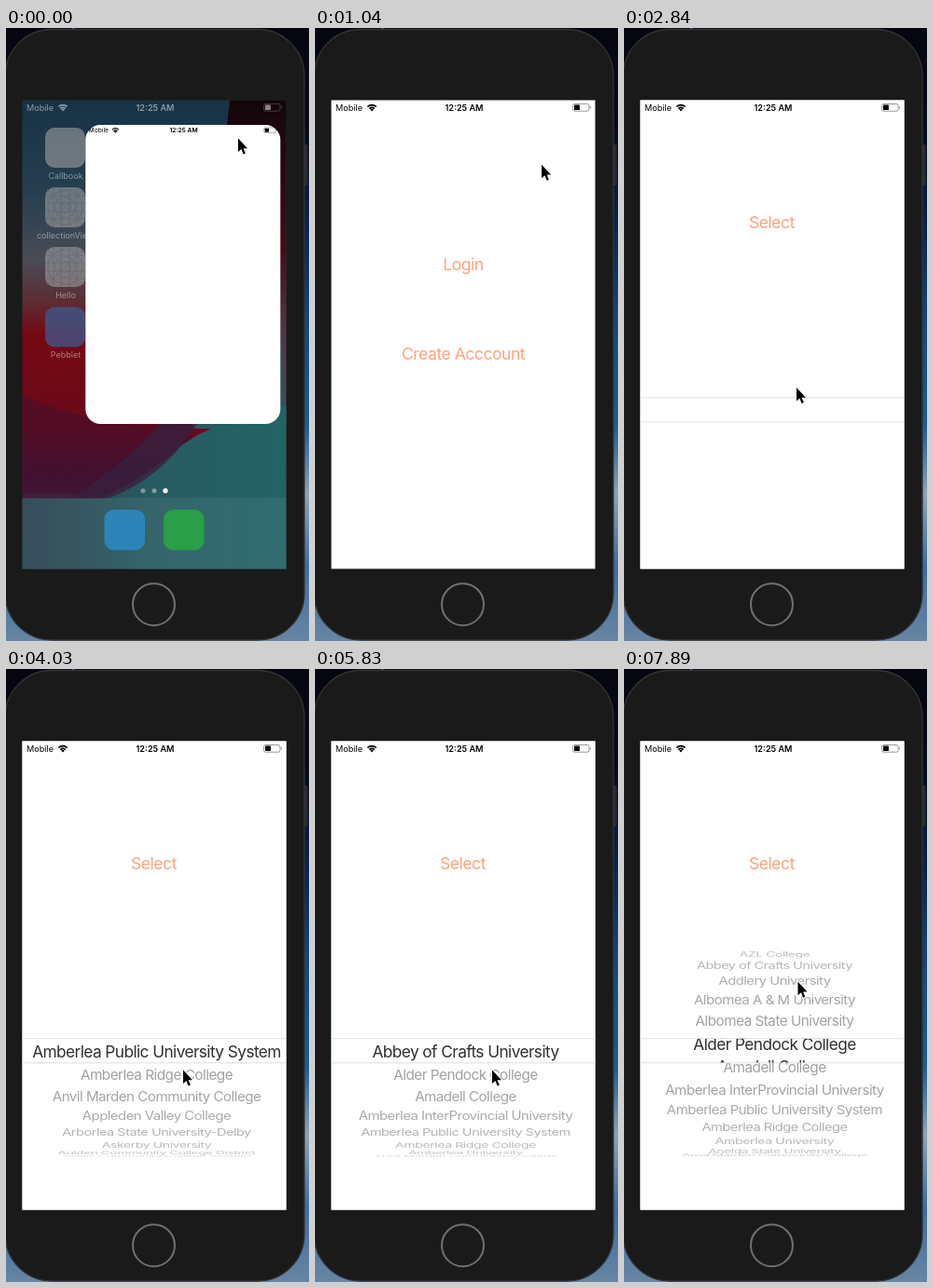
Recreate the animation shown at these times as an HTML page. Size 325 px wide and 658 px high, loop 8 s.

```html
<!DOCTYPE html>
<html lang="en">
<head>
<meta charset="utf-8">
<title>College picker</title>
<style>
  html, body { margin: 0; width: 100%; height: 100%; overflow: hidden; background: #06070f; }
  svg { display: block; width: 325px; height: 658px; }
  text { font-family: Inter, "Liberation Sans", sans-serif; letter-spacing: -.034em; white-space: pre; }
  .mid text, text.mid { text-anchor: middle; }
  .bar text { font-size: 9.1px; letter-spacing: 0; }
  .link { font-size: 17.5px; fill: #ffa37b; text-anchor: middle; letter-spacing: -.026em; }
  #rows { font-size: 15.4px; fill: #a0a0a0; }
  #focus { font-size: 17.3px; fill: #303030; }
  #labels { font-size: 9px; fill: #fff; fill-opacity: .45; }
  #labels text { letter-spacing: 0; }
</style>
</head>
<body>
<svg viewBox="0 0 325 658">
  <defs>
    <linearGradient id="sky" x2="0" y2="1">
      <stop offset="0" stop-color="#05060e"/>
      <stop offset=".17" stop-color="#070b1c"/>
      <stop offset=".33" stop-color="#0a2450"/>
      <stop offset=".47" stop-color="#10477c"/>
      <stop offset=".65" stop-color="#1c5c94"/>
      <stop offset=".76" stop-color="#8ba3b6"/>
      <stop offset=".88" stop-color="#3d6ca0"/>
      <stop offset="1" stop-color="#6885a3"/>
    </linearGradient>
    <linearGradient id="wall" x2="0" y2="1">
      <stop offset="0" stop-color="#163345"/>
      <stop offset=".2" stop-color="#263f50"/>
      <stop offset=".34" stop-color="#494b55"/>
      <stop offset=".43" stop-color="#5c2c34"/>
      <stop offset=".5" stop-color="#750812"/>
      <stop offset=".7" stop-color="#6a0a1a"/>
      <stop offset=".8" stop-color="#441234"/>
      <stop offset="1" stop-color="#28505c"/>
    </linearGradient>
    <linearGradient id="teal" x2="1" y2="0">
      <stop offset="0" stop-color="#2a3f4e"/>
      <stop offset=".5" stop-color="#285b61"/>
      <stop offset="1" stop-color="#226466"/>
    </linearGradient>
    <linearGradient id="dusk" x2="0" y2="1">
      <stop offset="0" stop-color="#12060a"/>
      <stop offset=".45" stop-color="#420c16"/>
      <stop offset=".7" stop-color="#4a3a48"/>
      <stop offset="1" stop-color="#2c5a60"/>
    </linearGradient>
    <clipPath id="screen"><rect x="17" y="77" width="284" height="504"/></clipPath>
    <clipPath id="outer"><path d="M17 297H301V396.500H17ZM17 423H301V523.500H17Z"/></clipPath>
    <clipPath id="band"><rect x="17" y="397" width="284" height="25.500"/></clipPath>
    <g id="bar" class="bar" fill="currentColor">
      <text x="22" y="88.500">Mobile</text>
      <path d="M56.300 84.500a6.600 6.600 0 0 1 9.400 0M58.300 86.600a3.800 3.800 0 0 1 5.400 0" fill="none" stroke="currentColor" stroke-width="1.700"/>
      <path d="M61 89.500l-1.800-1.900a2.600 2.600 0 0 1 3.600 0z"/>
      <text class="mid" x="160" y="88.500" font-weight="600">12:25 AM</text>
      <rect x="276.700" y="81.500" width="17.300" height="7.700" rx="1.800" fill="none" stroke="currentColor" stroke-opacity=".45" stroke-width=".9"/>
      <rect x="278" y="82.600" width="5.900" height="5.500" rx=".6"/>
      <path d="M295 84a1.400 1.400 0 0 1 0 2.700z" fill-opacity=".5"/>
    </g>
    <g id="grid">
      <rect width="43" height="43" rx="10" fill="#9a9c9e"/>
      <path d="M9 0V43M17 0V43M26 0V43M34 0V43M0 9H43M0 17H43M0 26H43M0 34H43M2 2L41 41M41 2L2 41" stroke="#777b7e" stroke-width=".6"/>
      <g fill="none" stroke="#777b7e" stroke-width=".7">
        <circle cx="21.500" cy="21.500" r="18.500"/><circle cx="21.500" cy="21.500" r="11"/><circle cx="21.500" cy="21.500" r="6"/>
      </g>
    </g>
  </defs>

  <rect width="325" height="658" fill="url(#sky)"/>
  <rect x="71" width="2.500" height="1.500" fill="#3f6fae"/>
  <rect x="316" y="125" width="7.500" height="44" rx="1.500" fill="#2c2c2e"/>
  <rect x="-1" y="1.500" width="321" height="655.500" rx="50" fill="#1a1a1a" stroke="#333437" stroke-width="1.300"/>
  <circle cx="158.500" cy="618.700" r="22.500" fill="none" stroke="#707070" stroke-width="2"/>

  <g clip-path="url(#screen)">
    <g id="home">
      <rect x="17.500" y="77.500" width="283" height="503" fill="url(#wall)"/>
      <path d="M240 77.500H300.500V430H200Z" fill="url(#dusk)"/>
      <path d="M17.500 395C80 420 130 430 190 425L240 500H17.500Z" fill="#42102e" fill-opacity=".55"/>
      <path d="M300.500 405C250 420 215 425 180 455S130 490 100 505H17.500V580.500H300.500Z" fill="url(#teal)"/>
      <path d="M110 505C160 485 185 455 205 425H165C145 450 120 470 70 505Z" fill="#38203e" fill-opacity=".8"/>
      <g id="icons">
        <rect x="17.500" y="504.500" width="283" height="76" fill="#8fa9b4" fill-opacity=".13"/>
        <g opacity=".62">
          <rect x="42" y="107" width="43" height="43" rx="10" fill="#9a9c9e"/>
          <use href="#grid" x="42" y="171"/>
          <use href="#grid" x="42" y="235"/>
          <rect x="42" y="299.500" width="43" height="43" rx="10" fill="#3269a4"/>
        </g>
        <rect x="105.500" y="517" width="43.500" height="43.500" rx="10" fill="#2e83b8"/>
        <rect x="169" y="517" width="43.500" height="43.500" rx="10" fill="#2a9e48"/>
        <g id="labels" class="mid">
          <text x="64" y="162">Callbook</text>
          <text x="64" y="226">collectionVie...</text>
          <text x="64" y="290">Hello</text>
          <text x="64" y="354">Pebblet</text>
        </g>
        <g fill="#fff">
          <circle cx="147" cy="496.700" r="2.500" fill-opacity=".4"/>
          <circle cx="159" cy="496.700" r="2.500" fill-opacity=".4"/>
          <circle cx="171" cy="496.700" r="2.700" fill-opacity=".9"/>
        </g>
        <use href="#bar" color="#fff" opacity=".5"/>
      </g>
      <rect id="dim" x="17" y="77" width="284" height="504"/>
    </g>

    <rect id="card" fill="#fff"/>
    <g id="menu">
      <text class="link" x="159" y="259.500">Login</text>
      <text id="create" class="link" x="159" y="356">Create Acccount</text>
    </g>
    <g id="sheet">
      <rect x="17.500" y="77.500" width="283" height="503" fill="#fff"/>
      <text class="link" x="158.500" y="215">Select</text>
      <path d="M17.500 396.800H300.500M17.500 422.800H300.500" stroke="#dcdcdc" stroke-width=".9"/>
      <g clip-path="url(#outer)"><g id="rows" class="mid"></g></g>
      <g clip-path="url(#band)"><g id="focus" class="mid"></g></g>
    </g>
    <g id="status"><use href="#bar" color="#000"/></g>
  </g>
  <path id="cursor" d="M0 0V14.500L3.400 11.500 5.600 17 7.800 16.100 5.600 10.700H10Z" stroke="#fff" stroke-width="1.800" paint-order="stroke"/>
</svg>
<script>
const LOOP = 8000;
const TICK = 148.6; // the picture advances in steps of this many ms
const OPENED = 3, MENU = 7, TAP = 14, DRAG = 50.6;

// Colleges by the tick of their arrival; the wheel keeps them sorted.
const batches = {
  22: ['Amberlea Public University System', 'Anvil Marden Community College',
       'Appleden Valley College', 'Arborlea State University-Delby', 'Askerby University',
       'Aulden Community College District', 'Avelly Community College System'],
  26: ['Amberlea Ridge College'],
  31: ['Aragrove Bay Community College'],
  34: ['Abbey of Crafts University', 'Amadell College', 'Amberlea University'],
  38: ['Alder Pendock College'],
  39: ['Amberlea InterProvincial University'],
  40: ['Anelda State University'],
  51: ['AZL College', 'Addlery University', 'Albomea A & M University', 'Albomea State University']
};

// Resting and turning points of the pointer: tick, x, y.
const stops = [
  [6, 249, 118.5], [11, 192, 390], [13, 179, 353], [16, 179, 353], [19, 185, 386],
  [21, 185, 386], [23, 190, 430.5], [45, 190, 430.5], [46, 191, 417], [49, 186.5, 474]
];

const $ = id => document.getElementById(id);
const mix = (a, b, p) => a + (b - a) * p;
const clamp = p => Math.min(1, Math.max(0, p));
const smooth = p => p * p * (3 - 2 * p);
const show = (el, on) => el.setAttribute('display', on ? 'inline' : 'none');
const move = (el, x, y, sx = 1, sy = sx) =>
  el.setAttribute('transform', `translate(${x} ${y}) scale(${sx} ${sy})`);

function addText(group, name) {
  const el = document.createElementNS('http://www.w3.org/2000/svg', 'text');
  el.textContent = name;
  el.setAttribute('dy', '.364em');
  group.append(el);
  return el;
}

const colleges = Object.entries(batches)
  .flatMap(([tick, names]) => names.map(name => ({ name, tick: +tick })))
  .sort((a, b) => a.name < b.name ? -1 : 1);
for (const college of colleges) {
  college.texts = [addText($('rows'), college.name), addText($('focus'), college.name)];
}

const scrolled = k => 5.32 * clamp((k - DRAG) / (53 - DRAG));

function drawWheel(k) {
  const radius = 112.5, depth = 725, step = 12.7 * Math.PI / 180;
  let place = 0;
  for (const { tick, texts } of colleges) {
    const here = k >= tick;
    const angle = (place - scrolled(k)) * step;
    const visible = here && Math.abs(angle) < Math.PI / 2;
    const cos = Math.cos(angle);
    const sx = depth / (depth + radius * (1 - cos));
    for (const el of texts) {
      show(el, visible);
      move(el, 161.5, 410.3 + radius * Math.sin(angle), sx, .12 + .88 * cos);
    }
    texts[0].setAttribute('fill-opacity', .5 + .5 * cos);
    if (here) place++;
  }
}

function drawCard(k) {
  const p = k < OPENED ? 1 - .19 ** k : 1;
  const x = mix(85.3, 17.5, p), y = mix(104, 77.5, p), width = mix(209, 283, p);
  const box = { x, y, width, height: mix(321, 503, p), rx: mix(16, 0, p) };
  for (const key in box) $('card').setAttribute(key, box[key]);
  const scale = width / 283;
  move($('status'), x - 17.5 * scale, y - 77.5 * scale, scale);
  $('dim').setAttribute('opacity', .6 * p);
  show($('icons'), k < 1);
  show($('home'), k < OPENED);
}

function drawSheet(k) {
  const p = clamp((k - TAP) / 4);
  show($('menu'), k >= MENU);
  $('create').setAttribute('fill-opacity', k >= TAP ? .3 : 1);
  show($('sheet'), p > 0);
  move($('sheet'), 0, 503 * (1 - p) ** 3);
}

function drawCursor(k) {
  const next = stops.findIndex(stop => stop[0] > k);
  const to = next < 0 ? stops.at(-1) : stops[next];
  const from = next < 0 ? to : stops[Math.max(0, next - 1)];
  const p = smooth(clamp((k - from[0]) / (to[0] - from[0] || 1)));
  move($('cursor'), mix(from[1], to[1], p), mix(from[2], to[2], p) - 26 * scrolled(k));
}

function draw(t) {
  const k = Math.floor((t + 6) / TICK);
  drawCard(k);
  drawSheet(k);
  drawWheel(k);
  drawCursor(k);
}

const start = performance.now();
function tick() {
  draw((performance.now() - start) % LOOP);
  requestAnimationFrame(tick);
}
tick();
</script>
</body>
</html>
```
